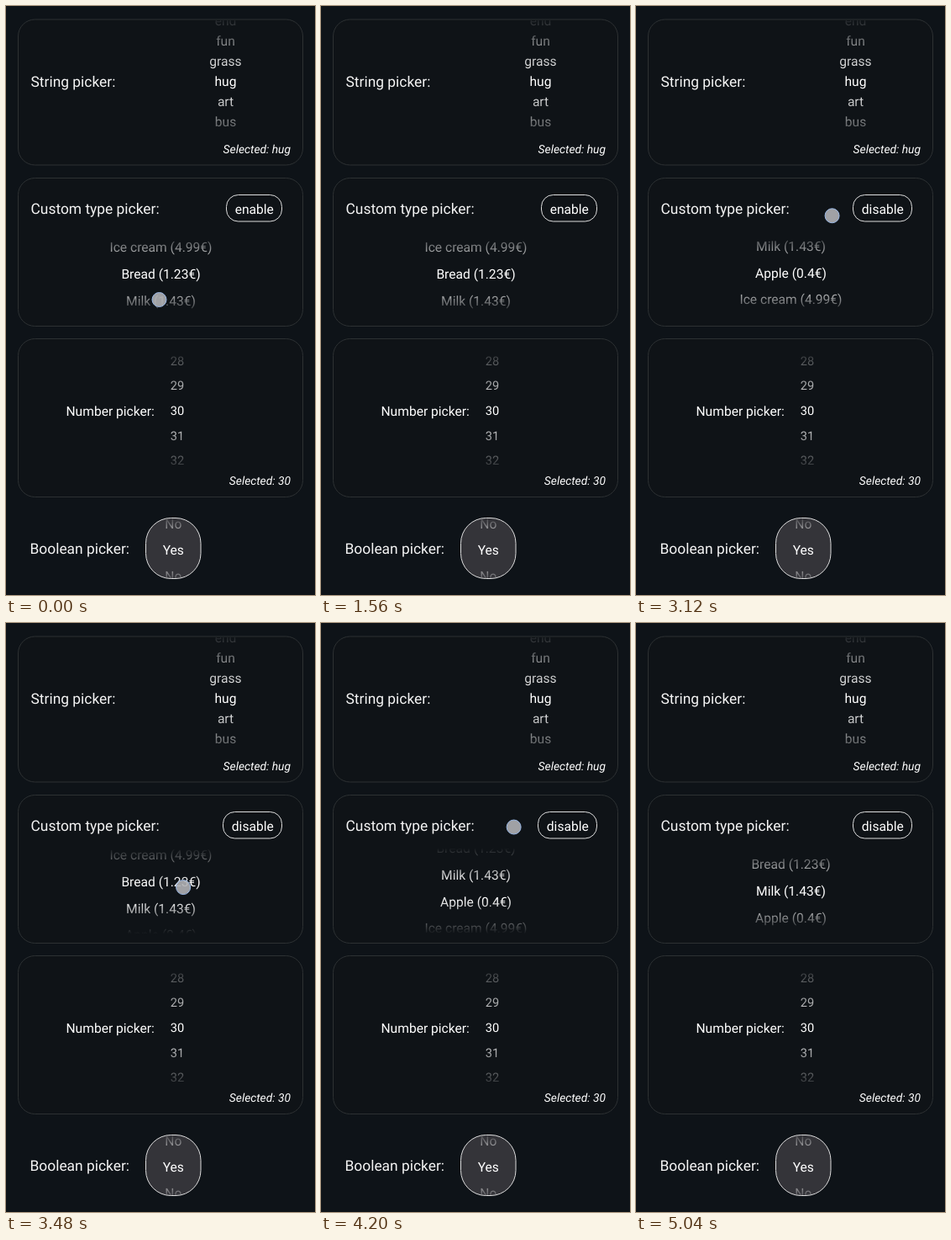
Animation of 368 by 700 pixels, one loop 5400 ms. Source, as an HTML page:

```html
<!DOCTYPE html>
<html lang="en">
<head>
<meta charset="utf-8">
<title>Pickers</title>
<style>
html, body { margin: 0; width: 100%; height: 100%; overflow: hidden; background: #0e1318; }
svg { display: block; font: 15.6px Roboto, sans-serif; fill: #fff; text-rendering: geometricPrecision; }
.card { fill: #0f1317; stroke: #2d3133; }
.pill { fill: none; stroke: #ddd; }
.title { font-size: 17.4px; fill: #f4f4f4; }
.note { font-size: 13.8px; font-style: italic; text-anchor: end; }
.num { font-size: 14.6px; }
.mid { text-anchor: middle; }
</style>
</head>
<body>
<svg id="stage" width="368" height="700" viewBox="0 0 368 700">
  <defs id="defs">
    <clipPath id="boolClip"><rect x="167" y="609" width="65" height="71" rx="30"/></clipPath>
    <clipPath id="wordClip"><rect x="15" y="17" width="338" height="172"/></clipPath>
  </defs>
  <rect class="card" x="14.5" y="16" width="339" height="173" rx="20"/>
  <rect class="card" x="14.5" y="204.5" width="339" height="176" rx="20"/>
  <rect class="card" x="14.5" y="395.5" width="339" height="188" rx="20"/>
  <rect x="166.5" y="608.5" width="65.5" height="72" rx="30" fill="#343439" stroke="#ddd"/>

  <text class="title" x="29.5" y="95.5">String picker:</text>
  <text class="title" x="29.5" y="247.2">Custom type picker:</text>
  <text x="71.5" y="486.5">Number picker:</text>
  <text class="title" x="28.5" y="651.2">Boolean picker:</text>
  <text class="note" x="339" y="175">Selected: hug</text>
  <text class="note" x="339" y="569">Selected: 30</text>

  <g id="words" clip-path="url(#wordClip)"></g>
  <g id="foods"></g>
  <g id="numbers" class="num"></g>
  <g id="bools" clip-path="url(#boolClip)"></g>

  <rect id="pill" class="pill" y="224.5" height="31.5" rx="14"/>
  <text id="pillText" class="mid" y="246.5"></text>
  <circle id="dot" r="8.5" fill="#b0b1b5" fill-opacity=".9" stroke="#9ab8e6"/>
</svg>
<script>
const LOOP = 5400, STEP = 120, ROW = 31.8, BASE = 324;
const FADE = 360, LAG = 50, TOGGLE = 2280;
const $ = id => document.getElementById(id);

function set(el, attrs) {
  for (const k in attrs) el.setAttribute(k, attrs[k]);
}

function add(parent, tag, attrs, text = '') {
  const el = document.createElementNS('http://www.w3.org/2000/svg', tag);
  set(el, attrs);
  el.textContent = text;
  parent.append(el);
  return el;
}

// A column of texts, opaque up to `near` from the center and gone at `far`.
function picker(id, items, x, baseline, gap, center, near, far) {
  const grad = add($('defs'), 'linearGradient', {
    id: id + 'Fade', gradientUnits: 'userSpaceOnUse', x1: 0, x2: 0, y1: center - far, y2: center + far
  });
  for (const d of [-far, -near, near, far]) {
    add(grad, 'stop', {
      offset: 0.5 + d / far / 2, 'stop-color': '#fff', 'stop-opacity': Math.abs(d) < far ? 1 : 0
    });
  }
  return items.map((s, i) =>
    add($(id), 'text', { class: 'mid', x, y: baseline + i * gap, fill: `url(#${id}Fade)` }, s));
}

picker('words', ['end', 'fun', 'grass', 'hug', 'art', 'bus'], 261.5, 23.3, 24, 90, 8, 78);
picker('numbers', [28, 29, 30, 31, 32], 204, 426.5, 29.7, 481, 4, 78);
picker('bools', ['No', 'Yes', 'No'], 199.3, 620.5, 31, 646, 8, 40);
const foods = picker('foods',
  ['Bread (1.23€)', 'Milk (1.43€)', 'Apple (0.4€)', 'Ice cream (4.99€)'],
  184.5, BASE, ROW, 318.5, 10, 51);

// Turning points of each touch: time, x, y.
const idleSwipe = [[0, 182.5, 349], [540, 212, 253], [960, 182, 346], [1200, 212.5, 279.5]];
const tap = [[2040, 293, 241], [2160, 293, 241]];
const swipe = [[2880, 213, 313], [3070, 234, 248], [3840, 192.5, 368], [4320, 236, 221], [4440, 228, 281]];
const touches = [idleSwipe, tap, swipe];

const clamp = v => Math.min(1, Math.max(0, v));
const ease = p => (1 - Math.cos(Math.PI * p)) / 2;

// Finger position, eased between turning points and held at both ends.
function finger(path, t) {
  let [, x, y] = path[0];
  for (let i = 1; i < path.length; i++) {
    const [t0, x0, y0] = path[i - 1], [t1, x1, y1] = path[i];
    const p = ease(clamp((t - t0) / (t1 - t0)));
    x += (x1 - x0) * p;
    y += (y1 - y0) * p;
  }
  return [x, y];
}

function draw(now) {
  const t = Math.floor(now % LOOP / STEP) * STEP;

  // The list trails the finger slightly and wraps around.
  const offset = finger(swipe, t - LAG)[1] - swipe[0][2];
  const span = ROW * foods.length;
  foods.forEach((el, i) => {
    const d = i * ROW + offset + span / 2;
    set(el, { y: BASE + (d % span + span) % span - span / 2 });
  });

  const on = t >= TOGGLE, left = on ? 258.5 : 262.5, right = 328.5;
  set($('pill'), { x: left, width: right - left });
  set($('pillText'), { x: (left + right) / 2 + 0.3 });
  $('pillText').textContent = on ? 'disable' : 'enable';

  const path = touches.filter(p => p[0][0] <= t).pop();
  const [cx, cy] = finger(path, t);
  const lifted = path[path.length - 1][0];
  set($('dot'), { cx, cy, opacity: 1 - clamp((t - lifted) / FADE) });
  requestAnimationFrame(draw);
}
draw(0);
</script>
</body>
</html>
```
